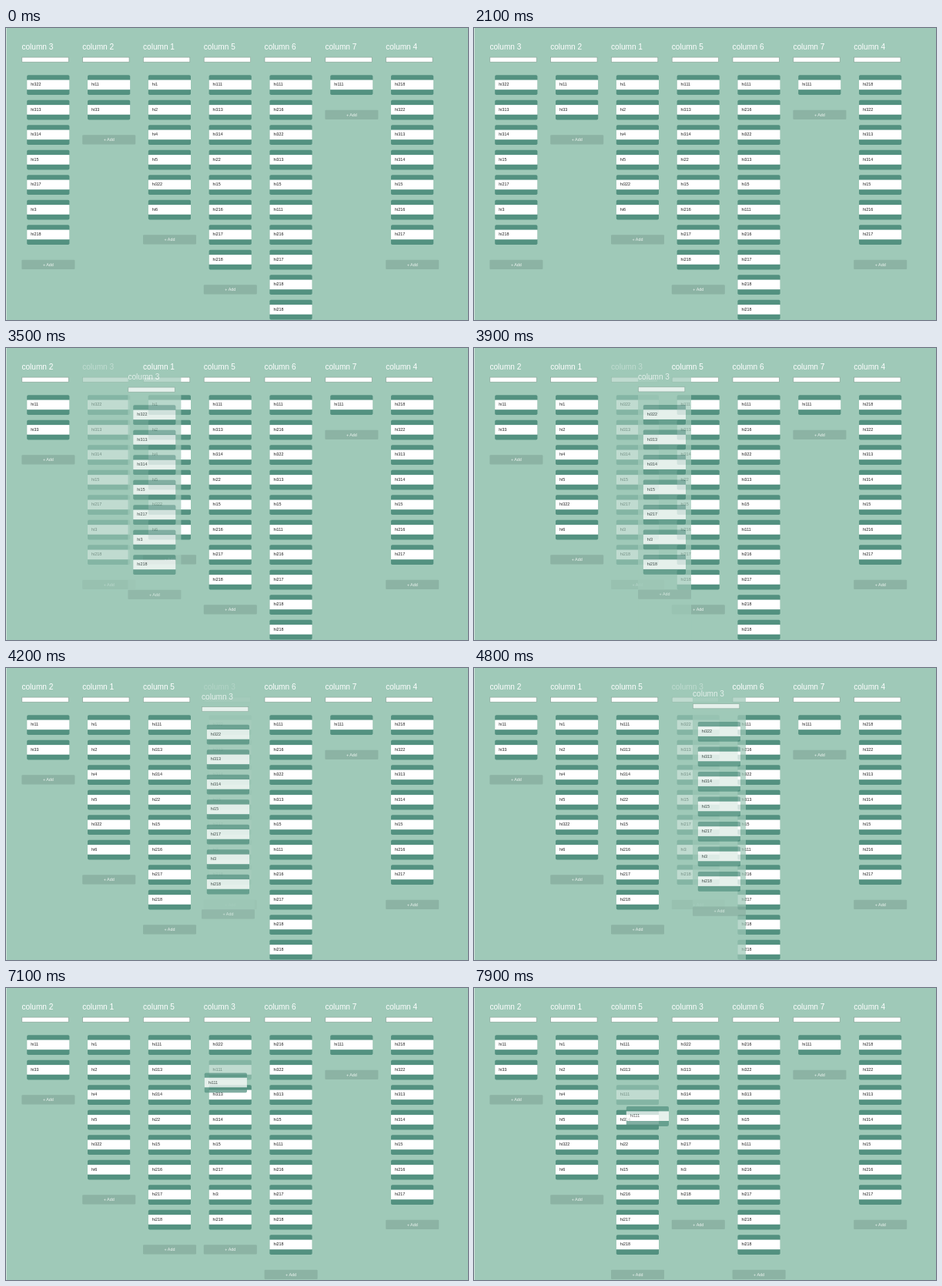
Write an HTML page that moves like this. It is 600 px wide and 380 px high and loops after 8000 ms.

```html
<!DOCTYPE html>
<html lang="en">
<head>
<meta charset="utf-8">
<title>Board</title>
<style>
  html, body { margin: 0; width: 100%; height: 100%; overflow: hidden; background: #9fc9b8; }
  svg { display: block; width: 600px; height: 380px; }
  text { font-family: "Liberation Sans", Arial, sans-serif; font-size: 5.4px; fill: #1c1c1c; }
  .title { font-size: 10.1px; fill: #fff; }
  .add { fill: #f0f6f3; text-anchor: middle; }
</style>
</head>
<body>
<svg id="stage" viewBox="0 0 600 380"></svg>
<script>
const LOOP = 8000, STEP = 100;
const LEFT = 20.4, PITCH = 78.8, COL_W = 69;
const TOP = 61.3, ROW = 32.5;
const GHOST = 0.73, HOLE = 0.35, FRESH_HOLE = 0.2;
const BG = '#9fc9b8', DARK = '#539180', BUTTON = '#8cb3a4';

const LISTS = {
  2: 'hi11 hi33',
  1: 'hi1 hi2 hi4 hi5 hi322 hi6',
  5: 'hi111 hi313 hi314 hi22 hi15 hi216 hi217 hi218',
  6: 'hi111 hi216 hi322 hi313 hi15 hi111 hi216 hi217 hi218 hi218',
  7: 'hi111',
  4: 'hi218 hi322 hi313 hi314 hi15 hi216 hi217',
  3: 'hi322 hi313 hi314 hi15 hi217 hi3 hi218'
};
const DRAGGED = '3', REST = ['2', '1', '5', '6', '7', '4'];
const cardsOf = id => LISTS[id].split(' ');

// key points of each drag
const COLUMN_PATH = [
  { t: 2900, x: 22, y: 2 },
  { t: 3500, x: 158.4, y: 13 },
  { t: 4200, x: 254, y: 12.5 },
  { t: 4700, x: 291, y: 8.6 },
  { t: 4800, x: 284, y: 8.6 }
];
const CARD_PATH = [
  { t: 6200, x: 340, y: 63 },
  { t: 6400, x: 310.2, y: 72.2 },
  { t: 7900, x: 197.8, y: 154.1 }
];

const stage = document.getElementById('stage');
const lerp = (a, b, k) => a + (b - a) * k;
const rect = (x, y, w, h, fill, extra = '') =>
  `<rect x="${x}" y="${y}" width="${w}" height="${h}" fill="${fill}" ${extra}/>`;
const text = (x, y, s, cls = '') => `<text x="${x}" y="${y}" class="${cls}">${s}</text>`;
const group = (body, opacity) => `<g opacity="${opacity}">${body}</g>`;

function pathAt(path, t) {
  const i = path.findIndex(p => p.t >= t);
  if (i < 0 || t < path[0].t) return null;
  const b = path[i], a = path[i - 1] || b;
  const k = (t - a.t) / (b.t - a.t || 1);
  return { x: lerp(a.x, b.x, k), y: lerp(a.y, b.y, k) };
}

function card(x, y, label) {
  return rect(x, y, 55.2, 25.8, DARK, 'rx="1.8"') +
    rect(x, y + 6.3, 55.2, 12.6, '#fff') +
    text(x + 5, y + 14.1, label);
}

function column(id, x, dy, cards, hole = -1) {
  let out = text(x, 28.3 + dy, 'column ' + id, 'title') +
    rect(x + 0.4, 38.1 + dy, 60.4, 6.1, '#fff', 'stroke="#839d91" stroke-width=".6"');
  cards.forEach((label, i) => {
    const c = card(x + 6.8, TOP + dy + ROW * i, label);
    out += i === hole ? group(c, HOLE) : c;
  });
  const y = TOP + dy + ROW * cards.length + 13;
  return out + rect(x, y, COL_W, 12.3, BUTTON, 'rx="1"') +
    text(x + COL_W / 2, y + 7.9, '+ Add', 'add');
}

// slot of the dragged column: it follows the pointer, then stays
function slotAt(t) {
  if (t < COLUMN_PATH[0].t) return 0;
  const p = pathAt(COLUMN_PATH, t) || COLUMN_PATH.at(-1);
  return Math.floor((p.x + 10 - LEFT) / PITCH);
}

// column and row under the pointer while a card is dragged
function dropAt(p) {
  const px = p.x + 20 - LEFT, slot = Math.floor(px / PITCH);
  const row = Math.max(0, Math.floor((p.y - TOP) / ROW));
  return px - slot * PITCH <= COL_W ? { slot, row } : null;
}

function draw(t) {
  const slot = slotAt(t), order = [...REST];
  order.splice(slot, 0, DRAGGED);
  const dragCol = pathAt(COLUMN_PATH, t), dragCard = pathAt(CARD_PATH, t);
  const drop = dragCard && dropAt(dragCard);
  const holeOpacity = slot === slotAt(t - STEP) ? HOLE : FRESH_HOLE;

  let out = rect(0, 0, 600, 380, BG) + rect(0, 0, 0.8, 380, '#dcebe4');
  order.forEach((id, i) => {
    const cards = cardsOf(id), hole = drop && drop.slot === i ? drop.row : -1;
    if (dragCard && id === '6') cards.shift();
    if (hole >= 0) cards.splice(hole, 0, 'hi111');
    const body = column(id, LEFT + PITCH * i, 0, cards, hole);
    out += dragCol && id === DRAGGED ? group(body, holeOpacity) : body;
  });

  if (dragCol) {
    const { x, y } = dragCol;
    out += group(rect(x, 20 + y, COL_W, 380, BG) + column(DRAGGED, x, y, cardsOf(DRAGGED)), GHOST);
  }
  if (dragCard) out += group(card(dragCard.x, dragCard.y, 'hi111'), GHOST);
  stage.innerHTML = out;
}

let last = -1;
function tick() {
  const t = Math.floor((performance.now() % LOOP) / STEP) * STEP;
  if (t !== last) draw(last = t);
  requestAnimationFrame(tick);
}
tick();
</script>
</body>
</html>
```
